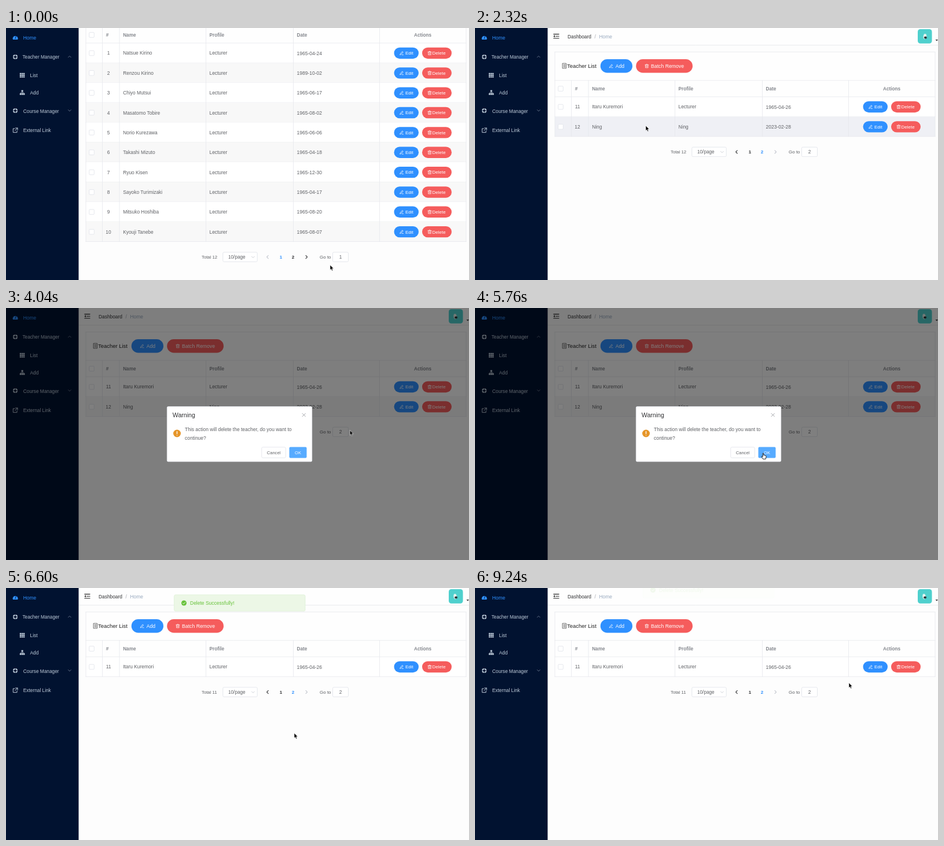
These frames come from a looping animation (800x436 px, 9280 ms). An HTML page:

```html
<!DOCTYPE html>
<html lang="en">
<head>
<meta charset="utf-8">
<title>Teacher Manager</title>
<style>
  html, body { margin: 0; width: 100%; height: 100%; overflow: hidden; background: #fdfdfd; }
  svg { display: block; width: 100%; height: 100%; font-family: "Liberation Sans", Arial, sans-serif; }
  .mid { text-anchor: middle; }
  .bold { font-weight: bold; }
  .line { fill: none; stroke-linecap: round; stroke-linejoin: round; }

  #first, #second, #third, #hoverRow, #arrow, #hand { animation: 9.28s step-end infinite; }
  #first { animation-name: first; }
  #second { animation-name: second; }
  #third { animation-name: third; }
  #hoverRow { animation-name: hover-row; }
  #arrow { animation-name: arrow; }
  #hand { animation-name: hand; }
  #nextPage { animation: page-hover 9.28s step-end infinite; }
  #pressed { animation: press 9.28s infinite; }
  #shade { animation: shade 9.28s infinite; }
  #dialog { animation: dialog 9.28s infinite; }
  #message { animation: message-fade 9.28s infinite, message-slide 9.28s infinite; }
  #cursor { animation: travel 9.28s ease-in-out infinite; }
  .figure { animation: wobble .64s step-end infinite; transform-box: fill-box; transform-origin: 50% 100%; }

  @keyframes first { 0% { opacity: 1 } 7.54%, 100% { opacity: 0 } }
  @keyframes second { 0% { opacity: 0 } 7.54% { opacity: 1 } 65.63%, 100% { opacity: 0 } }
  @keyframes third { 0% { opacity: 0 } 65.63%, 100% { opacity: 1 } }
  @keyframes hover-row { 0% { opacity: 0 } 20.6% { opacity: 1 } 39.3%, 100% { opacity: 0 } }
  @keyframes page-hover { 0% { fill: #303133 } 4.1%, 100% { fill: #2f90ff } }
  @keyframes press {
    0%, 34.7% { fill: #f55c5c } 35.8%, 37.4% { fill: #f78080 }
    38.3%, 39.3% { fill: #d95055 } 40.4%, 100% { fill: #f55c5c }
  }
  @keyframes shade {
    0%, 38.578% { opacity: 0 } 40.733%, 64.763% { opacity: .5 } 66.918%, 100% { opacity: 0 }
  }
  @keyframes dialog {
    0%, 38.578% { opacity: 0; transform: translateY(-12px) }
    41.81%, 64.763% { opacity: 1; transform: none }
    67.996%, 100% { opacity: 0; transform: translateY(-12px) }
  }
  @keyframes message-fade {
    0%, 65.086% { opacity: 0 } 68.319% { opacity: 1 }
    97.414% { opacity: 1; animation-timing-function: cubic-bezier(.3, .2, .6, .95) }
    100% { opacity: .03 }
  }
  @keyframes message-slide {
    0%, 65.086% { transform: translateY(-28.5px) } 69.397% { transform: none }
    97.414% { transform: none; animation-timing-function: cubic-bezier(.35, .15, .7, .9) }
    100% { transform: translateY(-25.2px) }
  }
  @keyframes arrow {
    0% { opacity: 1 } 4.1% { opacity: 0 } 7.54% { opacity: 1 } 34.7% { opacity: 0 }
    38.58% { opacity: 1 } 46.12% { opacity: 0 } 68.1%, 100% { opacity: 1 }
  }
  @keyframes hand {
    0% { opacity: 0 } 4.1% { opacity: 1 } 7.54% { opacity: 0 } 34.7% { opacity: 1 }
    38.58% { opacity: 0 } 46.12% { opacity: 1 } 68.1%, 100% { opacity: 0 }
  }
  @keyframes travel {
    0% { transform: translate(560px, 410px) }
    4.53%, 11.85% { transform: translate(497px, 399px) }
    20.47% { transform: translate(305px, 188px) }
    25%, 26.94% { transform: translate(295px, 169px) }
    35.56% { transform: translate(752px, 172px) }
    39.22% { transform: translate(752px, 172px); animation-timing-function: ease-in }
    43.53% { transform: translate(595px, 211px); animation-timing-function: ease-out }
    46.55%, 72.84% { transform: translate(498px, 251px) }
    81.9%, 84% { transform: translate(163px, 167px); animation-timing-function: ease-in }
    93.1% { transform: translate(420px, 166px); animation-timing-function: ease-out }
    99.57%, 100% { transform: translate(646px, 164px) }
  }
  @keyframes wobble { 0% { transform: rotate(-8deg) } 50% { transform: rotate(8deg) } }
</style>
</head>
<body>
<svg id="stage" viewBox="0 0 800 436"></svg>
<script>
const BLUE = '#2f90ff', RED = '#f55c5c', INK = '#606266', DARK = '#303133',
      MUTED = '#c0c4cc', RULE = '#e6e8ec', NAV = '#bfcbd9', GREEN = '#67c23a';
const ROW = 34.35, TABLE_TOP = 119;
const COLUMNS = [138, 166.5, 196, 345.5, 496.5, 645.5, 795];

// y is the vertical centre of the text
const text = (x, y, s, size = 8.4, fill = INK, attrs = '') =>
  `<text x="${x}" y="${y + size * .36}" font-size="${size}" fill="${fill}" ${attrs}>${s}</text>`;
const box = (x, y, w, h, r, fill, attrs = '') =>
  `<rect x="${x}" y="${y}" width="${w}" height="${h}" rx="${r}" fill="${fill}" ${attrs}/>`;
const outline = (x, y, w, h, r = 2, stroke = '#dcdfe6', fill = '#fff') =>
  box(x, y, w, h, r, fill, `stroke="${stroke}" stroke-width=".7"`);
const line = (d, stroke = RULE, width = .8) =>
  `<path class="line" d="${d}" stroke="${stroke}" stroke-width="${width}"/>`;
const disc = (x, y, r, fill) => `<circle cx="${x}" cy="${y}" r="${r}" fill="${fill}"/>`;
const at = (x, y, content) => `<g transform="translate(${x} ${y})">${content}</g>`;
const MID = 'class="mid"', BOLD = 'class="bold"', MID_BOLD = 'class="mid bold"';

const pencil = (x, y) =>
  at(x, y, line('M-2.2 1.4L1.2-2.8L2.6-1.6L-.8 2.4L-2.5 2.8ZM.8 2.9H3', '#fff', .75));
const trash = (x, y) =>
  at(x, y, line('M-3-2H3M-1-2V-3H1V-2M-2.3-2V3H2.3V-2M-.8-.4V1.6M.8-.4V1.6', '#fff', .7));
const checkbox = y => outline(143.7, y - 4.3, 8.6, 8.6, 1.2);

function actions(y, attrs) {
  return box(670.5, y - 9.7, 42.5, 19.4, 9.7, BLUE) + pencil(683.5, y) + text(690, y, 'Edit', 8, '#fff') +
    box(719, y - 9.7, 51, 19.4, 9.7, RED, attrs) + trash(732, y) + text(736.5, y, 'Delete', 8, '#fff');
}

function navbar() {
  return box(125.5, 0, 674.5, 29.5, 0, '#fefefe') + line('M125.5 29.7H800', '#e4e6e9') +
    line('M135.8 10.6H145M139.5 14.2H145M135.8 17.8H145', '#222', 1.1) +
    '<path d="M138 12.2V16.2L135.4 14.2Z" fill="#222"/>' +
    text(160, 14.5, 'Dashboard', 8.4, DARK) + text(206.5, 14.5, '/', 8.4, '#a0a4ac') +
    text(214.5, 14.5, 'Home', 8.4, '#97a8be') +
    box(765, 2, 24.5, 24.8, 4.5, '#4fd0cd') +
    '<g class="figure"><ellipse cx="776.7" cy="14.6" rx="2.7" ry="4.6" fill="#e8f4ef"/>' +
    '<ellipse cx="778" cy="16.5" rx="2.4" ry="2" fill="#222b2e"/></g>' +
    '<path d="M795.5 20H800L797.8 22.6Z" fill="#333"/>';
}

function toolbar() {
  return line('M151.5 61.2H157.5V69.8H151.5ZM153 63.5H156M153 65.5H156M153 67.5H156', '#333', .7) +
    text(159, 65.8, 'Teacher List', 9.45, '#222') +
    box(216.7, 54, 55.3, 23.4, 11.7, BLUE) + pencil(235, 65.8) + text(242.8, 65.8, 'Add', 8.6, '#fff') +
    box(278.2, 54, 97.8, 23.4, 11.7, RED) + trash(296.8, 65.8) + text(304, 65.8, 'Batch Remove', 8.7, '#fff');
}

function pager(y, total, page) {
  const tone = on => on ? DARK : MUTED;
  const number = (n, x, id = '') =>
    text(x, y, n, 8, n === page ? BLUE : DARK, `${MID_BOLD} ${id}`);
  return text(338, y, `Total ${total}`, 7.75) +
    outline(374.8, y - 8.2, 59.4, 16.4) + text(384, y, '10/page', 8.2) +
    line(`M424.5 ${y - 1}l2.4 2.4l2.4-2.4`, MUTED) +
    line(`M453.2 ${y - 2.6}l-2.6 2.6l2.6 2.6`, tone(page > 1), 1.1) +
    number(1, 475) + number(2, 496, page === 1 ? 'id="nextPage"' : '') +
    line(`M518 ${y - 2.6}l2.6 2.6l-2.6 2.6`, tone(page < 2), 1.1) +
    text(542, y, 'Go to', 8) + outline(564.5, y - 8.2, 27, 16.4) + text(578, y, page, 8.2, INK, MID);
}

function tableRow([name, profile, date], i, start, live) {
  const top = TABLE_TOP + i * ROW, y = top + ROW / 2 + .3;
  const last = live && i === 1;
  return box(138, top, 657, ROW, 0, i % 2 ? '#f8f8f8' : '#fff') +
    (last ? box(138, top, 657, ROW, 0, '#eff0f5', 'id="hoverRow"') : '') +
    line(`M138 ${top + ROW}H795`) + checkbox(y) + text(177, y, start + i, 8.4, INK, MID) +
    text(202.2, y, name) + text(351.5, y, profile) + text(502.5, y, date, 8.5) +
    actions(y, last ? 'id="pressed"' : '');
}

function view(id, rows, { start, total, page, scroll = 0, live = false }) {
  const bottom = TABLE_TOP + rows.length * ROW;
  const heads = [[202.2, 'Name'], [351.5, 'Profile'], [502.5, 'Date']];
  return `<g id="${id}"><g transform="translate(0 ${-scroll})">` + navbar() +
    box(138, 41.5, 657, bottom - 41.5, 0, '#fefefe') + toolbar() +
    rows.map((row, i) => tableRow(row, i, start, live)).join('') +
    line(`M138 90.7H795M138 ${TABLE_TOP}H795M138 41.5H795`) +
    COLUMNS.map((x, i) => line(`M${x} ${i % 6 ? 91 : 41.5}V${bottom}`)).join('') +
    checkbox(105) + text(175, 105, '#', 8.4, '#85888e', MID_BOLD) +
    heads.map(([x, s]) => text(x, 105, s, 8.2, '#85888e', BOLD)).join('') +
    text(720, 105, 'Actions', 8.2, '#85888e', MID_BOLD) +
    pager(bottom + 26.7, total, page) + '</g></g>';
}

function sidebar() {
  const buoy = y => `<circle cx="16" cy="${y}" r="3.1" fill="none" stroke="${NAV}" stroke-width="2"/>` +
    line(`M16 ${y - 4.4}v2M16 ${y + 2.4}v2M11.6 ${y}h2M18.4 ${y}h2`, '#011230', .9);
  const cells = [0, 1, 2].map(r => [0, 1, 2].map(c =>
    box(23.8 + c * 3, 77.8 + r * 2.8, 2.5, 2.3, .2, NAV)).join('')).join('');
  return box(0, 0, 125.5, 436, 0, '#011230') +
    `<path d="M12 20A4.5 4.5 0 1 1 20.2 20Z" fill="${BLUE}"/>` + line('M16 18.5L17.2 14.5', '#011230', .9) +
    text(29.8, 17, 'Home', 8.4, BLUE) +
    buoy(50) + text(28.5, 50.5, 'Teacher Manager', 8.2, NAV) + line('M107.5 50.8l2.4-2.4l2.4 2.4', '#76849a') +
    cells + text(41.5, 82.3, 'List', 8.4, NAV) +
    box(26.6, 107.5, 3, 2.8, 0, NAV) + line('M28.1 110V114M25.2 114V112H31V114', NAV, .8) +
    [23.8, 26.8, 29.8].map(x => box(x, 113, 2.6, 2.8, 0, NAV)).join('') +
    text(41.5, 112.3, 'Add', 8.4, NAV) +
    buoy(143) + text(29.8, 143.8, 'Course Manager', 8.3, NAV) + line('M107.5 141.6l2.4 2.4l2.4-2.4', '#76849a') +
    line('M15 174H12.3V180.7H19V178M16.5 173H20V176.5M20 173L15.6 177.4', NAV, 1) +
    text(29.8, 177.3, 'External Link', 8.3, NAV);
}

function dialog() {
  return '<g id="dialog">' + outline(278.3, 170.5, 250.4, 95.3, 2, '#ebeef5') +
    text(287.8, 185.5, 'Warning', 10.6, DARK) + line('M512 182.4l5.4 5.4m0-5.4l-5.4 5.4', '#909399') +
    disc(295.5, 217, 6.5, '#e6962a') + line('M295.5 213.6V217.6M295.5 220.1V220.2', '#fff', 1.3) +
    text(309, 210.3, 'This action will delete the teacher, do you want to', 8.47) +
    text(309, 224.6, 'continue?', 8.47) +
    outline(441.8, 240.8, 41.5, 18.4) + text(462.5, 250, 'Cancel', 7.6, INK, MID) +
    box(489.5, 240.5, 30, 19, 2, '#57abff') + text(504.5, 250, 'OK', 7.5, '#fff', MID) + '</g>';
}

function message() {
  return '<g id="message">' + outline(290.5, 11.8, 226.5, 28.2, 2.5, '#dcefd3', '#ecf7e6') +
    disc(307.5, 26, 4.5, GREEN) + line('M305.3 26.1l1.6 1.6l2.8-3', '#fff', .9) +
    text(318, 26, 'Delete Successfully!', 8.5, GREEN) + '</g>';
}

function cursor() {
  return '<g id="cursor" stroke="#fff" stroke-width=".6" stroke-linejoin="round">' +
    '<path id="arrow" d="M0 0V8.6L1.9 6.9L3.2 9.9L4.7 9.2L3.4 6.3H6Z" fill="#000"/>' +
    '<path id="hand" d="M-.8 .5Q0-.6 .8 .5V3.6L2.4 3.8L4.6 4.6Q5.4 5 5 7L4.2 10.3H-.4L-2.8 6.6' +
    'Q-3.2 5.4-2 5.5L-.8 6.5Z" fill="#fff" stroke="#111" stroke-width=".9"/></g>';
}

const lecturer = (name, date) => [name, 'Lecturer', date];
const pageOne = [
  lecturer('Natsue Kirino', '1965-04-24'),
  lecturer('Renzou Kirino', '1989-10-02'),
  lecturer('Chiyo Mutsui', '1965-06-17'),
  lecturer('Masatomo Tobire', '1965-08-02'),
  lecturer('Norio Kurezawa', '1965-06-06'),
  lecturer('Takashi Mizuto', '1965-04-18'),
  lecturer('Ryuo Kisen', '1965-12-30'),
  lecturer('Sayoko Turimizaki', '1965-04-17'),
  lecturer('Mitsuko Hoshiba', '1965-08-20'),
  lecturer('Kyouji Tanebe', '1965-08-07')
];
const pageTwo = [lecturer('Itaru Kuremori', '1965-04-26'), ['Ning', 'Ning', '2023-02-28']];

document.getElementById('stage').innerHTML =
  box(0, 0, 800, 436, 0, '#fdfdfd') +
  view('first', pageOne, { start: 1, total: 12, page: 1, scroll: 93 }) +
  view('second', pageTwo, { start: 11, total: 12, page: 2, live: true }) +
  view('third', pageTwo.slice(0, 1), { start: 11, total: 11, page: 2 }) +
  sidebar() + box(0, 0, 800, 436, 0, '#000', 'id="shade"') + dialog() + message() + cursor();
</script>
</body>
</html>
```
